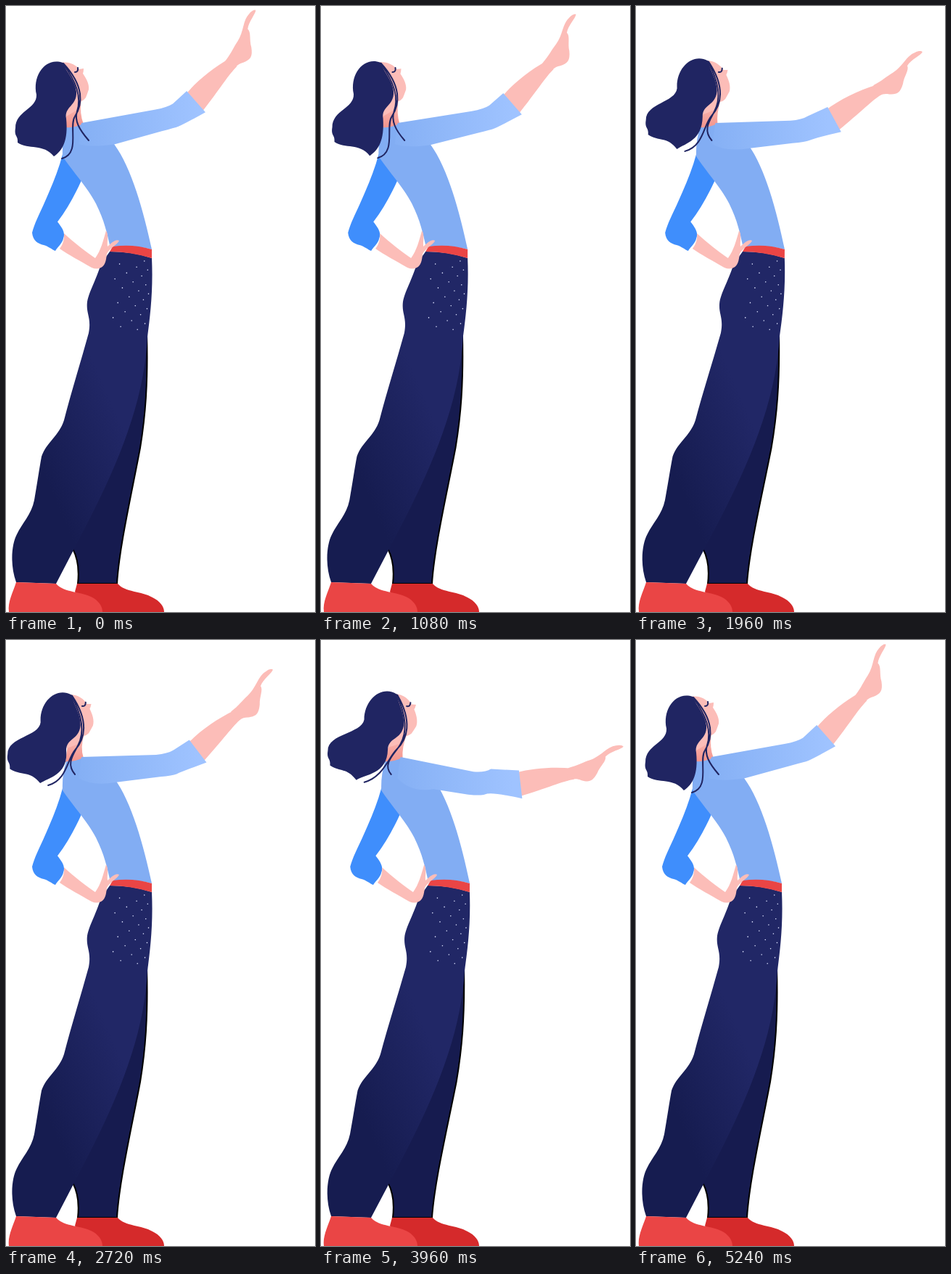
An HTML page that plays this animation: 426 by 834 pixels, repeating every 5280 ms.

```html
<!DOCTYPE html>
<html lang="en">
<head>
<meta charset="utf-8">
<title>Pointing woman</title>
<style>
html, body { margin: 0; width: 100%; height: 100%; overflow: hidden; background: #fff }
svg { display: block; width: 100%; height: 100% }
.skin { fill: #fcbdb8 }
.hair { fill: #202562 }
.line { fill: none; stroke: #202562; stroke-width: 2; stroke-linecap: round }
</style>
</head>
<body>
<svg viewBox="0 0 426 834">
  <defs>
    <linearGradient id="sleeveTone" gradientUnits="userSpaceOnUse" x1="95" y1="0" x2="265" y2="0">
      <stop stop-color="#84aff4"/><stop offset="1" stop-color="#9fc3ff"/>
    </linearGradient>
    <linearGradient id="pantsTone" gradientUnits="userSpaceOnUse" x1="50" y1="640" x2="165" y2="590">
      <stop stop-color="#161c50"/><stop offset="1" stop-color="#212766"/>
    </linearGradient>
    <linearGradient id="neckTone" gradientUnits="userSpaceOnUse" x1="0" y1="130" x2="0" y2="166">
      <stop stop-color="#fcbdb8"/><stop offset="1" stop-color="#f3968e"/>
    </linearGradient>
  </defs>

  <path id="neck" fill="url(#neckTone)"/>
  <g id="body">
    <path fill="#3f8efc" d="M78 204C72 228 62 250 52 273C46 286 39 300 36 312C37 323 44 327 52 329C59 331 63 335 68 337C71 332 78 326 79 320C82 312 78 306 71 297C84 280 94 262 104 240L88 205z"/>
    <path fill="#161b4f" stroke="#000" stroke-width="2" d="M194 450C196 520 192 565 185 608C173 672 156 745 153 795L99 795C101 777 99 760 92 747L150 560z"/>
    <path fill="url(#pantsTone)" d="M143 338Q175 338 201 347C203 390 199 425 195 455C190 560 140 660 94 747L69 795L14 793C5 768 8 740 15 727C22 712 35 700 39 680C43 657 46 636 49 620C56 600 73 592 80 570C90 531 103 490 114 450C118 428 110 424 112 407C115 392 123 380 131 355z"/>
    <path id="dots" fill="none" stroke="#dfe4ff" stroke-width="1.6" stroke-linecap="round"/>
    <path fill="#82adf3" d="M83 167Q95 168 106 162L149 190C174 224 190 285 201 335Q172 327 144 333C139 312 136 296 124 272C112 249 92 228 78 207Q77 185 83 167z"/>
    <path fill="#ea4545" d="M147 331Q175 327 201 335L201 347Q170 338 143 338z"/>
    <path class="skin" d="M80 313C94 326 110 338 123 347C131 336 134 323 138 309C142 315 139 324 140 331C145 326 152 320 156 323C153 329 143 333 139 341C138 350 137 357 131 360Q125 363 118 360C101 350 87 343 74 334Q81 325 80 313z"/>
  </g>
  <path fill="#d52a2b" d="M98 795L154 795C164 807 187 805 202 814C212 819 218 826 218 834L110 834L95 806z"/>
  <path fill="#ea4545" d="M4 834C2 820 10 806 14 793L69 795C80 808 104 805 121 815C130 821 133 828 133 834z"/>

  <g id="head">
    <path class="skin" d="M76 78C87 76 96 81 101 87L107 86Q107 90 106 93C111 100 115 108 114 115Q112 121 110 126Q106 131 103 131L100 142L83 152L76 110z"/>
    <path class="line" d="M95 91Q100 91 99 85"/>
  </g>
  <path id="hair" class="hair"/>

  <path id="forearm" class="skin" d="M-4-17C20-20 48-18 74-12L74 3C60 3 35 10-4 16z"/>
  <path id="hand" class="skin" d="M300 74C308 64 312 54 317 47C326 33 324 18 333 9C336 5 340 3 342 4C342 9 332 20 331 30C336 34 333 45 336 55C338 68 335 72 325 76C316 78 313 84 309 89z"/>
  <path id="sleeve" fill="url(#sleeveTone)"/>
  <path id="strands" class="line"/>
</svg>

<script>
const LOOP = 5280;

// Every joint turns back at the same moments; angles in degrees, sway in pixels
const beats = [0, 580, 1340, 2100, 2690, 3950, LOOP];
const joints = {
  upper: [-13.4, -9, -13, -2.5, -3.5, 13],
  fore: [-43, -38, -44, -29, -39, -8],
  turn: [0, 11, 1, 27, 14, 38],
  sway: [0, 3, .5, 4.2, 0, 4],
  tilt: [0, 3, 0, 10, 9, 13]
};

const $ = id => document.getElementById(id);
const set = (id, name, value) => $(id).setAttribute(name, value);
const polar = (deg, r) => [r * Math.cos(deg * Math.PI / 180), r * Math.sin(deg * Math.PI / 180)];

function pose(t) {
  const i = beats.findIndex(b => b > t) - 1;
  const u = (t - beats[i]) / (beats[i + 1] - beats[i]);
  const ease = (1 - Math.cos(Math.PI * u)) / 2;
  const now = {};
  for (const name in joints) {
    const v = joints[name];
    now[name] = v[i] + (v[(i + 1) % v.length] - v[i]) * ease;
  }
  return now;
}

function draw(t) {
  const { upper, fore, turn, sway, tilt } = pose(t);

  // The head follows the body, the loose hair trails behind the tilt
  const hx = .78 * tilt + 2.25 * sway, hy = -.2 * tilt;
  const lx = 13 + 3 * sway - 1.2 * tilt, ly = 168 - 1.2 * tilt;
  const dx = 66 + 2.5 * sway - 2.1 * tilt, dy = 207 - 1.1 * tilt;

  const [cos, sin] = polar(tilt, 1);
  const lean = sway / 455;
  const pt = (x, y) => `${x.toFixed(2)} ${y.toFixed(2)} `;
  const onBody = (x, y) => pt(x + lean * (795 - y), y);
  const onHead = (x, y) => {
    x -= 85; y -= 110;
    return pt(85 + hx + x * cos - y * sin, 110 + hy + x * sin + y * cos);
  };
  const left = (x, y) => pt(lx + x, ly + y);
  const low = (x, y) => pt(dx + x, dy + y);

  set('body', 'transform', `matrix(1 0 ${-lean} 1 ${795 * lean} 0)`);
  set('head', 'transform', `translate(${hx} ${hy}) rotate(${tilt} 85 110)`);
  set('neck', 'd', `M${onHead(83, 130)}L${onHead(104, 128)}Q${onHead(101, 148)}${onBody(107, 163)}`
    + `L${onBody(96, 170)}L${onBody(82, 168)}z`);

  set('hair', 'd', `M${onHead(78, 78)}C${onHead(55, 70)}${onHead(36, 95)}${onHead(42, 122)}`
    + `C${onHead(43, 142)}${left(0, -24)}${left(0, 0)}`
    + `C${left(-2, 12)}${left(4, 10)}${left(3, 20)}`
    + `C${left(18, 30)}${low(-14, -18)}${low(0, 0)}`
    + `C${low(12, -8)}${onBody(86, 185)}${onHead(83, 155)}`
    + `C${onHead(80, 138)}${onHead(98, 138)}${onHead(97, 118)}`
    + `C${onHead(95, 102)}${onHead(84, 92)}${onHead(78, 78)}z`);

  set('strands', 'd', `M${onHead(79, 79)}C${onHead(108, 110)}${onHead(106, 135)}${onHead(95, 152)}`
    + `C${onHead(86, 166)}${low(37, -4)}${low(11, 3)}`
    + `M${onHead(78, 79)}C${onHead(102, 110)}${onHead(103, 130)}${onHead(98, 145)}`
    + `C${onHead(94, 158)}${pt(dx + 35, 170)}${pt(dx + 48, 185)}`);

  // Shoulder, elbow, cuff and wrist form a chain
  const bend = fore - upper;
  const [ux, uy] = polar(upper, 98 - .35 * upper);
  const ex = 125.5 + 1.25 * sway + ux, ey = 178 + uy;
  const [vx, vy] = polar(upper + .62 * bend, 56 + .3 * fore);
  const cx = ex + vx, cy = ey + vy;
  const [wx, wy] = polar(fore, 70);
  set('forearm', 'transform', `translate(${cx} ${cy}) rotate(${fore})`);
  set('hand', 'transform', `translate(${cx + wx} ${cy + wy}) rotate(${turn}) translate(-311 -82)`);

  const [ox, oy] = polar(fore + 91.5, 19.5);
  const [nx, ny] = polar(upper + bend / 2 + 90, 15.5);
  const tx = ex - nx, ty = ey - ny, bx = ex + nx, by = ey + ny;
  const pitY = 191 + (ty - 143) * .35;
  set('sleeve', 'd', `M${onBody(104, 161)}L${pt(tx - 12, ty + (161 - ty) * .1)}`
    + `Q${pt(tx + 4, ty - 1)}${pt(tx + 12, ty - 6)}L${pt(cx - ox, cy - oy)}L${pt(cx + ox, cy + oy)}`
    + `Q${pt(bx + 14, by - 6)}${pt(bx + 5, by - 2)}`
    + `Q${pt(bx, by)}${pt(bx - 18, by + (pitY - by) * .2)}`
    + `L${onBody(150, pitY)}Q${onBody(118, pitY + 5)}${onBody(100, 190)}z`);
}

// Speckles on the hip, denser towards the right
let dots = '';
for (let i = 0; i < 24; i++) {
  const spread = (i * .618 + .25) % 1;
  dots += `M${197 - 50 * spread ** 1.5} ${351 + 4.1 * i}h0`;
}
set('dots', 'd', dots);

const start = performance.now();
function tick() {
  draw((performance.now() - start) % LOOP);
  requestAnimationFrame(tick);
}
tick();
</script>
</body>
</html>
```
